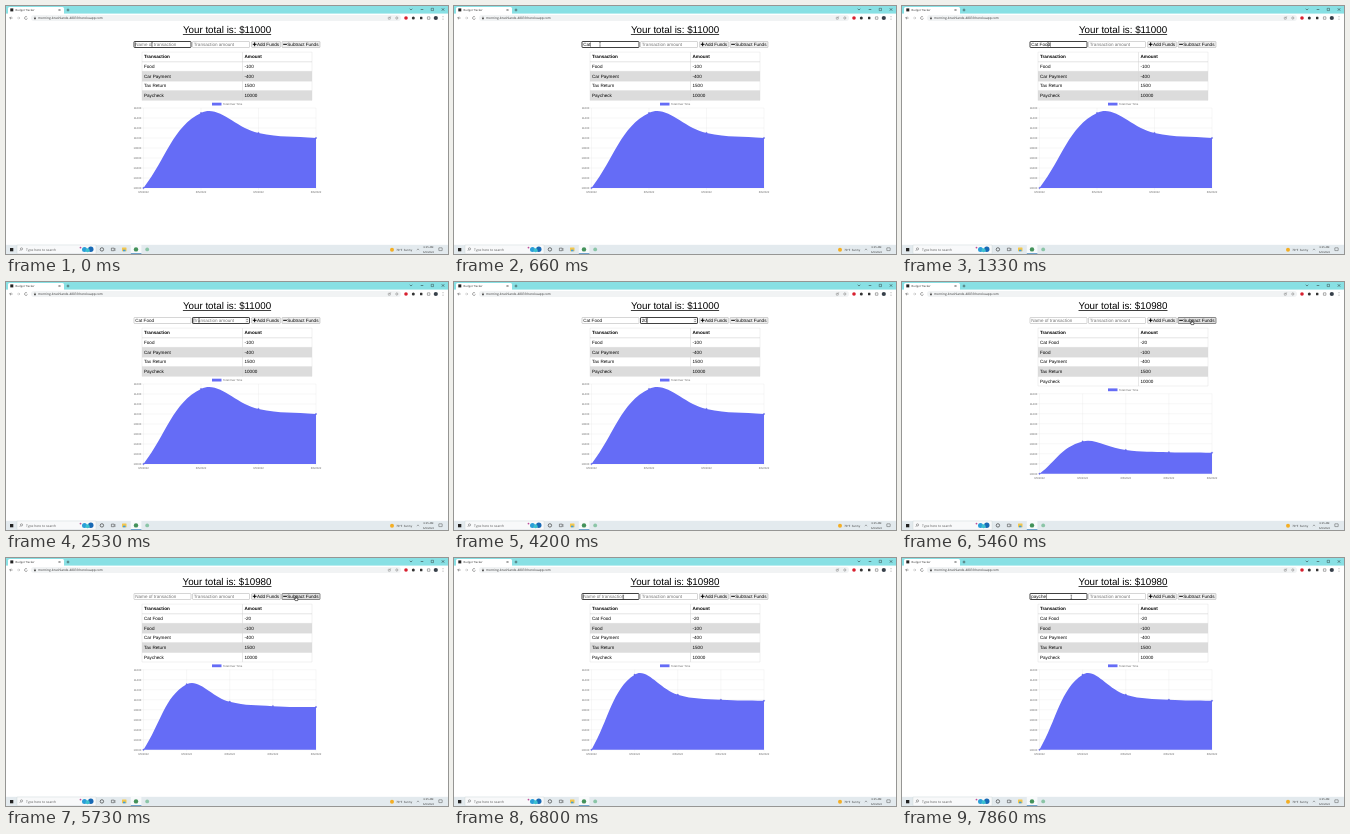
Recreate the animation shown at these times as an HTML page with a canvas. Size 442 by 248 pixels, loop 8 s.

```html
<!DOCTYPE html>
<html lang="en">
<head>
<meta charset="utf-8">
<title>Budget Tracker</title>
<style>
html, body { margin: 0; width: 100%; height: 100%; overflow: hidden; background: #fff; }
canvas { display: block; width: 442px; height: 248px; }
</style>
</head>
<body>
<canvas id="stage"></canvas>
<script>
const LOOP = 8000, BLINK = 530, SUBMIT = 5330;
const SANS = '"Liberation Sans", Arial, sans-serif';
const UI = '"Open Sans", sans-serif';
const BLUE = '#656cf6';

const canvas = document.getElementById('stage');
const ratio = window.devicePixelRatio || 1;
canvas.width = 442 * ratio;
canvas.height = 248 * ratio;
const ctx = canvas.getContext('2d');
ctx.scale(ratio, ratio);
ctx.textRendering = 'geometricPrecision';

function rect(x, y, w, h, color) {
  ctx.fillStyle = color;
  ctx.fillRect(x, y, w, h);
}

function box(x, y, w, h, r, fill, stroke, width = 0.4) {
  ctx.beginPath();
  ctx.roundRect(x, y, w, h, r);
  if (fill) { ctx.fillStyle = fill; ctx.fill(); }
  if (stroke) { ctx.strokeStyle = stroke; ctx.lineWidth = width; ctx.stroke(); }
}

function dot(x, y, r, fill, stroke, width = 0.5) {
  box(x - r, y - r, 2 * r, 2 * r, r, fill, stroke, width);
}

function line(points, color, width = 0.5) {
  ctx.beginPath();
  points.forEach(([x, y]) => ctx.lineTo(x, y));
  ctx.strokeStyle = color;
  ctx.lineWidth = width;
  ctx.stroke();
}

function text(str, x, y, size, { color = '#000', align = 'left', weight = '', font = SANS } = {}) {
  ctx.font = `${weight} ${size}px ${font}`;
  ctx.textAlign = align;
  ctx.fillStyle = color;
  ctx.fillText(str, x, y);
  return ctx.measureText(str).width;
}

function drawBrowser() {
  rect(0, 0, 442, 8, '#88e0e4');
  box(2, 1, 56, 8, 1.5, '#fff');
  rect(0, 7.6, 442, 9, '#fff');
  rect(4.3, 2.4, 3, 3, '#222');
  text('Budget Tracker', 9.5, 4.9, 2.75, { color: '#333', font: UI });
  const cross = (x, y, r) => {
    line([[x - r, y - r], [x + r, y + r]], '#222');
    line([[x - r, y + r], [x + r, y - r]], '#222');
  };
  cross(53.5, 4, 0.9);
  line([[60.6, 4], [63.4, 4]], '#222');
  line([[62, 2.6], [62, 5.4]], '#222');
  line([[403.7, 2.8], [405, 4], [406.3, 2.8]], '#222');
  line([[414.7, 3.5], [417.3, 3.5]], '#222');
  box(425.2, 2.3, 2.3, 2.3, 0, null, '#222');
  cross(437, 3.5, 1.2);

  line([[6.6, 12], [3.7, 12], [5, 10.7]], '#444');
  line([[3.7, 12], [5, 13.3]], '#444');
  line([[11, 12], [13.9, 12], [12.6, 10.7]], '#aaa');
  line([[13.9, 12], [12.6, 13.3]], '#aaa');
  ctx.beginPath();
  ctx.arc(20, 12, 1.4, 0.3, 5.6);
  ctx.strokeStyle = '#444';
  ctx.lineWidth = 0.5;
  ctx.stroke();
  box(25, 9, 370, 6, 3, '#f1f3f4');
  box(28, 11.7, 1.9, 1.6, 0.2, '#555');
  box(28.4, 10.8, 1.1, 1.4, 0.5, null, '#555', 0.3);
  text('morning-brushlands-48039.herokuapp.com', 32, 13.1, 3.2, { color: '#333', font: UI });
  box(382.3, 11.2, 2, 2, 0.2, null, '#555', 0.35);
  line([[383.3, 12], [384.8, 10.4]], '#555', 0.35);
  dot(390.8, 12, 1.1, null, '#555', 0.4);
  dot(400, 12, 1.8, '#d8202f');
  dot(407.3, 12, 1.5, '#333');
  box(414, 10.7, 2.4, 2.6, 0.4, '#333');
  box(421.4, 10.8, 2.5, 2.5, 0.2, null, '#333');
  dot(429.8, 12, 2.1, '#37404a');
  [10.7, 12, 13.3].forEach(y => dot(437, y, 0.35, '#444'));
}

function drawTaskbar() {
  rect(0, 238.8, 442, 9.2, '#e3eaee');
  rect(4, 242, 3.3, 3.3, '#222');
  box(11, 239, 79, 8.8, 0, '#f8f9fa', '#bcc4c8', 0.3);
  dot(15.5, 242.9, 1.1, null, '#333', 0.4);
  line([[14.7, 243.8], [13.7, 244.8]], '#333', 0.4);
  text('Type here to search', 20, 244.6, 3.3, { color: '#555', font: UI });
  dot(78.5, 243.4, 2.5, '#2a9ed8');
  dot(84.8, 243.2, 2.7, '#1769b5');
  dot(81.6, 244.2, 2, '#3bc0cf');
  dot(74.5, 241.6, 0.9, '#bd4c9a');
  dot(95.9, 243.4, 1.7, null, '#222', 0.6);
  box(105.4, 242.1, 2.8, 2.6, 0, null, '#333', 0.5);
  line([[109, 242], [109, 245]], '#333', 0.4);
  box(116, 241.6, 4.5, 3.7, 0.3, '#f3c64c');
  rect(117, 243.7, 2.5, 1.6, '#409edb');
  rect(124.8, 238.8, 10.6, 9.2, '#f8fafb');
  rect(124.8, 247.3, 10.6, 0.7, '#3a83bd');
  dot(130, 243.4, 2.2, '#43925a');
  dot(141.2, 243.4, 1.9, '#8bc5a7');
  dot(386, 243.8, 2, '#f4ae24');
  text('70°F  Sunny', 390.2, 244.8, 2.9, { color: '#333', font: UI });
  line([[410.8, 244], [412, 242.9], [413.2, 244]], '#333', 0.4);
  text('6:25 AM', 422.5, 242.4, 2.6, { color: '#222', align: 'center', font: UI });
  text('6/6/2022', 422.5, 246.6, 2.6, { color: '#222', align: 'center', font: UI });
  box(432.8, 241.8, 3.4, 2.8, 0.2, null, '#333', 0.4);
}

function drawInput(x, value, hint, focused, caretOn, spinner) {
  box(x, 35.5, 57, 6, 0.6, '#fff', focused ? '#111' : '#888', focused ? 0.8 : 0.35);
  const width = text(value || hint, x + 1.2, 40.1, 4.6, { color: value ? '#111' : '#777' });
  if (caretOn) rect(x + 1.2 + (value ? width : 0), 36.3, 0.4, 4.5, '#000');
  if (spinner) {
    rect(x + 53, 36.2, 3.2, 4.6, '#eee');
    line([[x + 53.8, 38], [x + 54.6, 37.1], [x + 55.4, 38]], '#444', 0.5);
    line([[x + 53.8, 39], [x + 54.6, 39.9], [x + 55.4, 39]], '#444', 0.5);
  }
}

function drawButton(x, w, label, plus, hover, focused) {
  box(x, 35.5, w, 6, 0.6, hover ? '#e1e1e1' : '#efefef', focused ? '#333' : '#888', focused ? 0.55 : 0.35);
  line([[x + 1.2, 38.3], [x + 4.9, 38.3]], '#000', 1);
  if (plus) line([[x + 3.05, 36.4], [x + 3.05, 40.2]], '#000', 1);
  text(label, x + 5.3, 40.1, 4.6);
}

function drawTable(rows) {
  const left = 136, split = 236.5, right = 306, top = 46.1, step = 9.65;
  [['Transaction', 'Amount'], ...rows].forEach((cells, i) => {
    const y = top + i * step;
    if (i && i % 2 === 0) rect(left, y, right - left, step, '#dcdcdc');
    box(left, y, split - left, step, 0, null, '#d6d6d6', 0.35);
    box(split, y, right - split, step, 0, null, '#d6d6d6', 0.35);
    const weight = i ? '' : 'bold';
    text(cells[0], left + 2, y + 6.2, 4.6, { weight });
    text(cells[1], split + 2, y + 6.2, 4.6, { weight });
  });
}

// Control offset around a point, scaled by the neighbouring distances.
function tangents(points) {
  return points.map((p, i) => {
    const a = points[i - 1] || p, b = points[i + 1] || p;
    const before = Math.hypot(p.x - a.x, p.y - a.y);
    const after = Math.hypot(b.x - p.x, b.y - p.y);
    const k = 0.4 / (before + after);
    const dx = b.x - a.x, dy = b.y - a.y;
    return {
      inX: p.x - k * before * dx, inY: p.y - k * before * dy,
      outX: p.x + k * after * dx, outY: p.y + k * after * dy
    };
  });
}

function drawChart(totals, base, grow) {
  const left = 137.5, right = 310, top = base - 80;
  const xAt = i => left + (right - left) * i / (totals.length - 1);
  const small = { color: '#666' };

  rect(206, top - 5.3, 9.5, 2.8, BLUE);
  text('Total Over Time', 217, top - 2.9, 2.76, small);
  for (let i = 0; i <= 8; i++) {
    const y = base - i * 10;
    line([[left - 2, y], [right, y]], '#e3e3e3', 0.3);
    text(10000 + i * 200, left - 2.3, y + 0.9, 2.76, { ...small, align: 'right' });
  }
  totals.forEach((_, i) => {
    line([[xAt(i), top], [xAt(i), base + 2]], '#e3e3e3', 0.3);
    text(i === totals.length - 1 ? '6/6/2022' : '6/5/2022', xAt(i), base + 4.8, 2.76, { ...small, align: 'center' });
  });

  const points = totals.map((v, i) => ({ x: xAt(i), y: base - (v - 10000) / 20 }));
  const bends = tangents(points);
  const rise = y => base + (Math.min(y, base) - base) * grow;
  ctx.beginPath();
  ctx.moveTo(left, base);
  points.slice(1).forEach((p, i) => {
    const a = bends[i], b = bends[i + 1];
    ctx.bezierCurveTo(a.outX, rise(a.outY), b.inX, rise(b.inY), p.x, rise(p.y));
  });
  ctx.lineTo(right, base);
  ctx.closePath();
  ctx.fillStyle = BLUE;
  ctx.fill();
  points.forEach(p => dot(p.x, rise(p.y), 0.75, BLUE, '#555bd0', 0.25));
}

const path = [
  [0, 146, 38.3], [1860, 146, 38.3], [2460, 193, 38.3], [4270, 193, 38.3],
  [4950, 290, 40], [5800, 290, 40], [6450, 169.3, 39], [LOOP, 169.3, 39]
];

function pointerAt(t) {
  const i = path.findIndex(p => p[0] > t);
  const [t0, x0, y0] = path[i - 1], [t1, x1, y1] = path[i];
  const u = (t - t0) / (t1 - t0), e = u * u * (3 - 2 * u);
  return { x: x0 + (x1 - x0) * e, y: y0 + (y1 - y0) * e };
}

function drawPointer({ x, y }) {
  if (x > 246) {
    ctx.beginPath();
    [[-0.6, -1.6], [0.3, -1.6], [0.3, 0], [2, 0.5], [1.7, 2.6], [-0.8, 2.6], [-1.9, 0.6], [-0.6, 1]]
      .forEach(([dx, dy]) => ctx.lineTo(x + dx, y + dy));
    ctx.closePath();
    ctx.fillStyle = '#fff';
    ctx.fill();
    ctx.strokeStyle = '#000';
    ctx.lineWidth = 0.55;
    ctx.stroke();
  } else {
    line([[x, y - 1.9], [x, y + 1.9]], '#222', 0.45);
    [-1.9, 1.9].forEach(d => line([[x - 0.8, y + d], [x + 0.8, y + d]], '#222', 0.4));
  }
}

const foodKeys = [400, 530, 660, 800, 930, 1060, 1200, 1330];
const amountKeys = [3130, 3930];
const payKeys = [7060, 7200, 7330, 7500, 7660, 7800];
const focusTimes = [[0, 'name'], [2460, 'amount'], [5200, 'subtract'], [6500, 'name']];
const edits = [...focusTimes.map(f => f[0]), ...foodKeys, ...amountKeys, ...payKeys];
const typed = (str, keys, t) => str.slice(0, keys.filter(k => k <= t).length);

const entries = [['Food', '-100'], ['Car Payment', '-400'], ['Tax Return', '1500'], ['Paycheck', '10000']];
const totals = [10000, 11500, 11100, 11000];

function draw(t) {
  const done = t >= SUBMIT;
  const pointer = pointerAt(t);
  const focus = focusTimes.filter(f => f[0] <= t).pop()[1];
  const lastEdit = Math.max(...edits.filter(e => e <= t));
  const caretOn = Math.floor((t - lastEdit) / BLINK) % 2 === 0;
  const name = done ? typed('payche', payKeys, t) : typed('Cat Food', foodKeys, t);
  const amount = done ? '' : typed('20', amountKeys, t);

  rect(0, 0, 442, 248, '#fff');
  drawBrowser();

  const width = text(`Your total is: $${done ? 10980 : 11000}`, 221, 27, 9.8, { align: 'center' });
  rect(221 - width / 2, 28, width, 0.75, '#000');

  const overAmount = pointer.x > 186.5 && pointer.x < 244;
  drawInput(128, name, 'Name of transaction', focus === 'name', focus === 'name' && caretOn, false);
  drawInput(186.5, amount, 'Transaction amount', focus === 'amount',
    focus === 'amount' && caretOn, focus === 'amount' || overAmount);
  drawButton(245.6, 28.8, 'Add Funds', true, pointer.x > 246 && pointer.x < 274, false);
  drawButton(276, 38, 'Subtract Funds', false, pointer.x > 276, done && focus === 'subtract');

  drawTable(done ? [['Cat Food', '-20'], ...entries] : entries);
  const u = Math.min(1, (t - SUBMIT) / 1000);
  if (done) drawChart([...totals, 10980], 191.7, 1 - (1 - u) ** 4);
  else drawChart(totals, 182, 1);

  drawTaskbar();
  drawPointer(pointer);
}

const start = performance.now();
function tick() {
  draw((performance.now() - start) % LOOP);
  requestAnimationFrame(tick);
}
tick();
</script>
</body>
</html>
```
